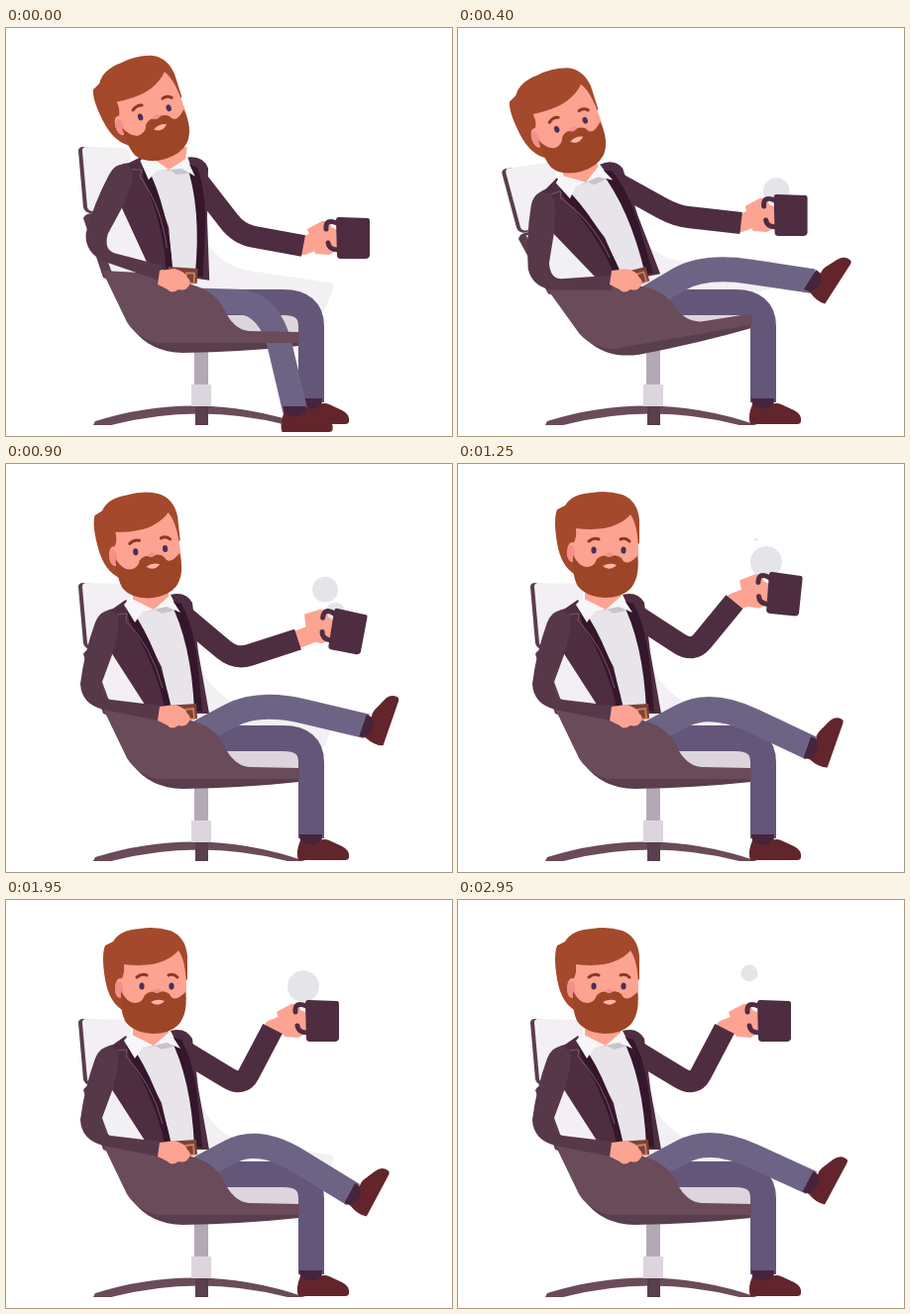
An HTML page with a canvas that plays this animation: 450 by 412 pixels, repeating every 3000 ms.

```html
<!DOCTYPE html>
<html lang="en">
<head>
<meta charset="utf-8">
<title>Coffee break</title>
<style>
html, body { margin: 0; width: 100%; height: 100%; overflow: hidden; background: #fff; }
canvas { display: block; }
</style>
</head>
<body>
<canvas id="stage" width="450" height="412"></canvas>
<script>
const ctx = document.getElementById('stage').getContext('2d');
const { PI, sin, cos, min, max, sqrt, hypot } = Math;
const LOOP = 3000, STEP = 50;
const JACKET = '#4e2d41', SLEEVE = '#573849', LINING = '#34172a', SKIN = '#fda392', HAIR = '#a4492b',
  BEARD = '#9d4527', SHIRT = '#e8e5ea', PAD = '#f2f0f3', SHELL = '#6a4b5a', RIM = '#593e4d',
  FAR_LEG = '#645679', NEAR_LEG = '#6d6485', SHOE = '#63252c', SOCK = '#45243c', STEAM = '#e5e5e9';

const mix = (a, b, u) => a + (b - a) * u;
const ramp = (t, from, to) => max(0, min(1, (t - from) / (to - from)));
const ease = (t, from, to) => {
  const u = ramp(t, from, to);
  return u * u * (3 - 2 * u);
};

function fill(color, d) {
  ctx.fillStyle = color;
  ctx.fill(new Path2D(d));
}
function line(color, width, d, cap = 'butt') {
  ctx.strokeStyle = color;
  ctx.lineWidth = width;
  ctx.lineCap = cap;
  ctx.stroke(new Path2D(d));
}
function oval(color, x, y, rx, ry = rx) {
  ctx.fillStyle = color;
  ctx.beginPath();
  ctx.ellipse(x, y, rx, ry, 0, 0, 2 * PI);
  ctx.fill();
}
// Draws in a frame rotated about (x, y).
function turned(x, y, angle, draw) {
  ctx.save();
  ctx.translate(x, y);
  ctx.rotate(angle);
  ctx.translate(-x, -y);
  draw();
  ctx.restore();
}
// Draws in a frame with its origin at (x, y).
function placed(x, y, angle, draw) {
  ctx.save();
  ctx.translate(x, y);
  ctx.rotate(angle);
  draw();
  ctx.restore();
}
function limb(color, width, a, joint, b, bend) {
  const near = p => p.map((v, i) => mix(joint[i], v, bend));
  line(color, width, `M${a}L${near(a)}Q${joint} ${near(b)}L${b}`);
}
// Joint of a two-part limb from a to b, bending downwards.
function elbow([ax, ay], [bx, by], upper, lower) {
  const d = hypot(bx - ax, by - ay), ux = (bx - ax) / d, uy = (by - ay) / d;
  const along = (upper ** 2 - lower ** 2 + d * d) / (2 * d);
  const drop = sqrt(max(0, upper ** 2 - along ** 2));
  return [ax + ux * along - uy * drop, ay + uy * along + ux * drop];
}

function base() {
  fill(SHELL, 'M88 401L90 397Q195 364 302 401L284 401Q195 378 106 401Z');
  fill(RIM, 'M191 380H204V401H191Z');
  fill('#b2a9b4', 'M190 322H204V362H190Z');
  fill('#dcd5dd', 'M187 360H207V382H187Z');
}
function chairBack() {
  fill(PAD, 'M194 202Q212 240 245 245L325 257Q332 258 330 263L321 286L200 290L180 220Z');
  fill(RIM, 'M78 192Q80 187 88 187L110 190L125 262L98 252Z');
  fill(PAD, 'M86 190L160 185L170 255L108 250Z');
  fill(RIM, 'M73 124Q73 120 78 120L84 120L92 186L85 187Q79 186 78 181Z');
  fill(PAD, 'M77 124Q77 120 81 120L119 121Q125 122 126 130L131 180L88 185Q83 185 82 181Z');
}
function seat() {
  fill('#ddd5dd', 'M200 265Q220 288 236 288L290 288Q297 288 297 295L297 309L236 311Z');
  fill(RIM, 'M128 304L150 317L297 316L296 321Q240 327 178 328Q145 327 128 304Z');
}
function shell() {
  fill(SHELL, 'M97 245L155 248L190 260Q211 266 220 284Q229 304 245 306L296 307L296 318L152 318Q132 313 122 297Z');
}
function torso() {
  fill(SKIN, 'M128 122L164 122L164 148L145 153L128 145Z');
  fill(SHIRT, 'M124 142L148 148L170 139L186 180L193 248L164 248Z');
  fill('#c9c3cc', 'M141 150L150 146L166 141L169 148L157 151L150 147Z');
  fill(JACKET, 'M94 158Q97 148 108 146L121 137L134 160L157 205L167 250L142 246L106 190Z');
  fill(LINING, 'M120 140L126 146Q154 186 167 247L160 246Q151 203 125 160Z');
  line('#75566a', 1, 'M112 152L122 151L121 158Q147 185 158 226');
  fill(JACKET, 'M166 132Q181 128 188 140L194 190L205 252L192 252L188 190Q183 163 166 132Z');
  fill(LINING, 'M165 138L177 141Q190 165 194 206L198 250L190 249Q187 180 165 138Z');
  fill('#f7f6f8', 'M125 135L149 147L138 149L130 160L119 142ZM149 147L165 133L176 150L162 144Z');
  fill('#7d4138', 'M162 244L192 242L193 257L164 260Z');
  line('#c98058', 1.8, 'M181 248L189 247L190 257L182 258Z');
}
function head() {
  fill(HAIR, 'M119 114Q104 106 100 82Q96 58 100 48L108 44Q115 32 135 31Q150 28 166 33Q181 39 183 58L183 82L150 110Z');
  fill(SKIN, 'M116 82Q120 78 119 67Q146 70 160 63Q169 59 174 53Q183 65 182 103L150 125L117 112Z');
  oval(SKIN, 115, 91, 5, 10);
  oval('#f58f89', 114, 92, 4, 8);
  fill(BEARD, 'M116 94Q123 107 131 106Q138 105 140 98Q146 92 152 96Q159 92 165 97Q169 107 181 95'
    + 'Q184 116 174 128Q165 137 148 137Q128 136 120 124Q115 114 116 94Z');
  fill('#ffb5a4', 'M146 105Q153 101 160 104Q153 111 146 105Z');
  fill('#f58f89', 'M148 94Q152 98 157 94L153 91Z');
  for (const x of [137, 167]) oval('#4b3156', x, 89, 2.6, 3.5);
  line('#8b3921', 3, 'M132 80Q137 76 142 78M164 78Q169 76 173 80', 'round');
}
function sleeve() {
  fill(SLEEVE, 'M90 160Q95 147 106 148Q116 152 113 168L108 190L97 220Q95 236 106 238L156 244L154 259L98 248'
    + 'Q76 242 75 222Q79 190 90 160Z');
}
function restingHand() {
  fill(SKIN, 'M155 245L170 243Q181 246 183 252Q188 256 184 261Q181 266 174 264Q167 269 163 264L153 259Z');
}
function shoe() {
  fill(SOCK, 'M-12-4L11-4L10 9L-10 9Z');
  fill(SHOE, 'M-11 2Q-4 8 5 6Q10-1 18 2L31 8Q39 12 38 19Q38 22 34 22L-13 22Q-16 14-11 2Z');
}
function mug() {
  fill(SKIN, 'M-46-9L-31-17Q-22-18-22-11L-15-8L-15 12L-24 17L-38 16Z');
  line(JACKET, 5, 'M-16-15Q-28-20-27-9M-25 5Q-24 12-15 12', 'round');
  fill(JACKET, 'M-17-18Q-17-21-14-21L15-20Q17-20 17-17L17 18Q16 21 13 21L-12 21Q-16 21-16 18Z');
}
function steam(t, x, y) {
  const gap = 630, life = 1290;
  for (let born = 0; born < 4 * gap; born += gap) {
    const age = t - born;
    if (age > 0 && age < life) {
      oval(STEAM, x - 8 - .016 * age, y - 10 - .036 * age, 16 * sin(PI * age / life));
    }
  }
}

function draw(t) {
  // Rock back once, then sit upright.
  const chair = -.175 * sin(PI * ramp(t, 0, 850)) ** 2;
  const body = 1.1 * chair + .14 * (1 - ease(t, 0, 300));
  const tilt = -.31 * (1 - ease(t, 600, 1100));
  const inChair = part => turned(190, 300, chair, part);
  const inBody = part => turned(185, 255, body, part);

  // Pull the mug in, then lift it.
  const pull = 1 - (1 - ramp(t, 0, 500)) ** 2, lift = ease(t, 600, 1450), arc = sin(PI * lift);
  const mx = 350 - 15 * pull - 16 * lift + 18 * arc, my = 212 - 24 * pull - 66 * lift;
  const shoulder = [185 - 10 * cos(body) + 105 * sin(body), 255 - 10 * sin(body) - 105 * cos(body)];
  const wrist = [mx - 50, my + 8];

  // Swing the leg up, let it sink, then keep bobbing.
  const swing = ease(t, 0, 350), sink = ease(t, 600, 1500);
  const bob = .08 * sink * cos(2 * PI * (t - 1950) / 600);
  const shin = mix(1.34, .15, swing) + .32 * sink + bob;
  const length = 112 - 16 * sin(PI * swing);
  const knee = [mix(266, 255, swing) + 40 * chair, mix(277, 239, swing ** 2)];
  const ankle = [knee[0] + length * cos(shin), knee[1] + length * sin(shin)];
  const toe = -(swing ** 2) - .08 * sink - .3 * sin(PI * sink);

  ctx.fillStyle = '#fff';
  ctx.fillRect(0, 0, 450, 412);
  ctx.lineJoin = 'round';
  base();
  inChair(chairBack);
  steam(t, mx, my);
  line(SKIN, 18, `M${wrist}L${mx - 32} ${my + 1}`, 'round');
  placed(mx, my, .24 * arc, mug);
  oval(JACKET, ...shoulder, 13);
  limb(JACKET, 22, shoulder, elbow(shoulder, wrist, 74, 66), wrist, .22);
  inChair(seat);
  limb(FAR_LEG, 26, [190, 277], [308, 277], [308, 378], .24);
  placed(308, 378, 0, shoe);
  inBody(() => {
    torso();
    turned(150, 145, tilt - body, () => placed(0, -2, 0, head));
  });
  limb(NEAR_LEG, 25, [187, 275], knee, ankle, .42);
  placed(...ankle, toe, shoe);
  inChair(shell);
  inBody(sleeve);
  restingHand();
}

const start = performance.now();
function tick() {
  const t = (performance.now() - start) % LOOP;
  draw(Math.floor(t / STEP) * STEP);
  requestAnimationFrame(tick);
}
tick();
</script>
</body>
</html>
```
